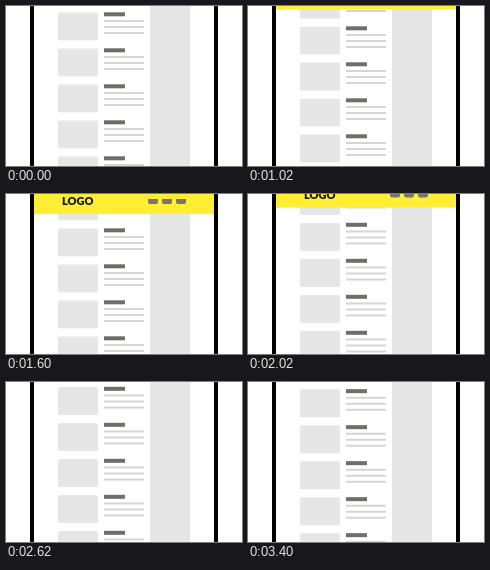
Write an HTML page that moves like this. It is 236x160 px and loops after 3.42 s.

```html
<!DOCTYPE html>
<html lang="en">
<head>
<meta charset="utf-8">
<title>Header that returns on scroll up</title>
<style>
  html, body { margin: 0; width: 100%; height: 100%; overflow: hidden; background: #fff; }
  svg { display: block; width: 236px; height: 160px; }
  text { font: 900 11px Lato, sans-serif; }
</style>
</head>
<body>
<svg viewBox="0 0 236 160">
  <defs>
    <g id="row">
      <rect x="52" width="40" height="28" rx="2" fill="#e6e6e6"/>
      <rect x="98" y="-.2" width="21" height="4" fill="#6e6e6a"/>
      <path d="M98 8.5h40m-40 6h40m-40 6h40" stroke="#d5d5d5" stroke-width="2"/>
    </g>
    <path id="tab" d="M0-15h10v3q0 2-2 2h-6q-2 0-2-2z" fill="#77756a"/>
  </defs>
  <rect x="144" width="40" height="160" fill="#e6e6e6"/>
  <g id="list"></g>
  <g id="header">
    <rect x="28" y="-30" width="180" height="30" fill="#ffee35"/>
    <text x="56" y="-9" fill="#14140a">LOGO</text>
    <use href="#tab" x="142"/>
    <use href="#tab" x="156"/>
    <use href="#tab" x="170"/>
  </g>
  <path d="M26 0v160M210 0v160" stroke="#000" stroke-width="4"/>
</svg>
<script>
const LOOP = 3420, PITCH = 36, LOWEST = -18.5;
const list = document.getElementById('list');
const header = document.getElementById('header');

for (let i = -1; i < 5; i++) {
  const row = document.createElementNS('http://www.w3.org/2000/svg', 'use');
  row.setAttribute('href', '#row');
  row.setAttribute('y', i * PITCH);
  list.append(row);
}

// time in ms, list position in px, speed in px/s
const keys = [
  [0, 6.5, -43],
  [440, -12.5, -43],
  [720, LOWEST, 0],
  [1020, -15.5, 20],
  [1600, -1.5, 18],
  [1730, -.3, 0],
  [2020, -7, -39],
  [2620, -31, -42],
  [LOOP, 6.5 - 2 * PITCH, -43]
];

function scrollAt(t) {
  const i = keys.findIndex(k => k[0] > t);
  const [t0, y0, v0] = keys[i - 1], [t1, y1, v1] = keys[i];
  const span = (t1 - t0) / 1000, u = (t - t0) / (t1 - t0), w = 1 - u;
  return w * w * ((1 + 2 * u) * y0 + u * span * v0)
       + u * u * ((3 - 2 * u) * y1 - w * span * v1);
}

const move = (el, y) => el.setAttribute('transform', `translate(0 ${y.toFixed(2)})`);

function draw(t) {
  const y = scrollAt(t);
  move(list, (y % PITCH + PITCH) % PITCH);
  // the header follows the list once scrolling has turned back
  move(header, t < 720 ? -2 : Math.max(-2, (y - LOWEST) * 1.18));
}

let start;
function tick(now) {
  start ??= now;
  draw((now - start) % LOOP);
  requestAnimationFrame(tick);
}
draw(0);
requestAnimationFrame(tick);
</script>
</body>
</html>
```
